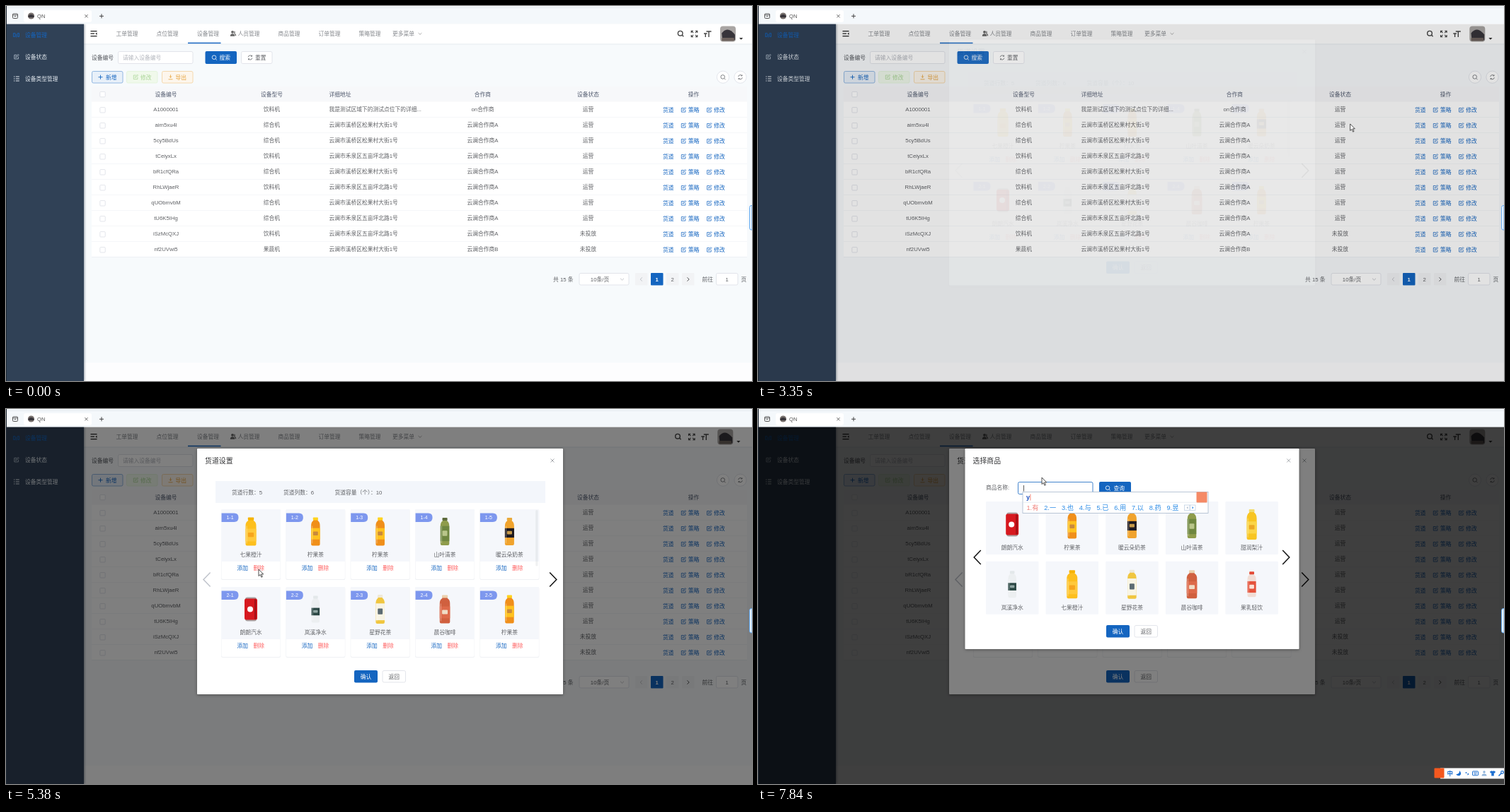
An HTML page for the animation above (8 s loop, 1054x531 px).

```html
<!DOCTYPE html>
<html lang="zh-CN">
<head>
<meta charset="utf-8">
<title>设备管理</title>
<style>
  html, body { margin: 0; width: 100%; height: 100%; overflow: hidden; background: #fff; }
  svg { display: block; width: 1054px; height: 531px; font-family: "Liberation Sans", "Noto Sans CJK SC", "Noto Sans CJK", sans-serif; }
  .side { filter: drop-shadow(1px 0 1.5px rgba(0, 21, 41, .4)); }
  .panel { filter: drop-shadow(0 1px 2px rgba(0, 0, 0, .35)); }
</style>
</head>
<body>
<svg id="stage" viewBox="0 0 1054 531"></svg>
<script>
const LOOP = 8000, PAGE_TOP = 25.4;
const BLUE = '#1465c0', TEXT = '#606266', DARK = '#303133', LINE = '#dcdfe6', TILE = '#f5f7fb', RED = '#ff5f5f';
const stage = document.getElementById('stage');
let parent = stage;

// ---------- drawing helpers ----------
function add(tag, attrs = {}) {
  const node = document.createElementNS(stage.namespaceURI, tag);
  for (const key in attrs) node.setAttribute(key, attrs[key]);
  parent.appendChild(node);
  return node;
}
function group(draw, attrs) {
  const g = add('g', attrs), outer = parent;
  parent = g;
  draw();
  parent = outer;
  return g;
}
const rect = (x, y, width, height, fill, more) => add('rect', { x, y, width, height, fill, ...more });
const circle = (cx, cy, r, fill, more) => add('circle', { cx, cy, r, fill, ...more });
const line = (d, stroke, w = 0.8, more) => add('path', { d, stroke, fill: 'none', 'stroke-width': w, ...more });
const shape = (d, fill, more) => add('path', { d, fill, ...more });
function text(x, cy, str, fill = TEXT, { size = 7.75, anchor = 'start', weight = 400 } = {}) {
  const node = add('text', { x, y: cy + size * 0.37, fill, 'font-size': size, 'text-anchor': anchor, 'font-weight': weight });
  node.textContent = str;
  return node;
}
const center = (x, cy, str, fill, more) => text(x, cy, str, fill, { anchor: 'middle', ...more });
const box = (x, y, w, h, fill = '#fff', stroke = LINE) =>
  rect(x + .5, y + .5, w - 1, h - 1, fill, { rx: 2, stroke, 'stroke-width': .8 });

// ---------- icons ----------
function magnifier(x, y, color, r = 2.8, w = .8) {
  circle(x - .3, y - .3, r, 'none', { stroke: color, 'stroke-width': w });
  line(`M${x + r * .7} ${y + r * .7}l${r * .6} ${r * .6}`, color, w);
}
function refresh(x, y, color) {
  line(`M${x - 2.8} ${y - .6}a2.9 2.9 0 0 1 5.3-1.2v-1.6m0 1.6h-1.6M${x + 2.8} ${y + .6}a2.9 2.9 0 0 1-5.3 1.2v1.6m0-1.6h1.6`, color);
}
function edit(x, y, color) {
  line(`M${x + .5} ${y - 2.7}h-3.2v5.6h5.6v-3M${x - .8} ${y + .8}l.3-1.3 3.1-3.1 1 1-3.1 3.1z`, color, .75);
}
const cross = (x, y, color, r = 2.5) => line(`M${x - r} ${y - r}l${2 * r} ${2 * r}m0 ${-2 * r}l${-2 * r} ${2 * r}`, color);
const plus = (x, y, color, r = 3) => line(`M${x - r} ${y}h${2 * r}M${x} ${y - r}v${2 * r}`, color, .9);
const sideChevron = (x, y, dx, dy, color, w = .8) =>
  line(`M${x - dx} ${y - dy}L${x + dx} ${y}L${x - dx} ${y + dy}`, color, w);
const downChevron = (x, y, color) => line(`M${x - 2.4} ${y - 1.2}l2.4 2.3 2.4-2.3`, color);
function avatar(x, y, w, h, r) {
  rect(x, y, w, h, '#a9a5a3', { rx: r });
  shape(`M${x + w * .1} ${y + h * .45}q${w * .4} ${-h * .5} ${w * .85} ${h * .1}v${h * .35}h${-w * .8}z`, '#37343a');
  rect(x + w * .1, y + h * .75, w * .8, h * .2, '#6d625d', { rx: 1 });
}

// ---------- browser bar, sidebar, page ----------
function browserBar() {
  rect(0, 0, 1054, PAGE_TOP, '#f4f8fb');
  rect(0, 2, 1054, .8, '#e3e9ee');
  rect(25, 6, 96, 17, '#fff', { rx: 3 });
  rect(9.5, 11, 7, 6.5, 'none', { stroke: '#444', 'stroke-width': .9, rx: 1 });
  line('M9.5 12.8h7M11.5 15.3l1.5-1.2 1.5 1.2', '#444', .8);
  circle(35.5, 14, 4.6, '#77706d');
  shape('M31.5 14q4-4 8 0v2h-8z', '#37343a');
  text(44, 14.5, 'QN', '#555', { size: 7.6 });
  cross(113.5, 14.3, '#444', 2.1);
  plus(135, 14.3, '#333');
}
function sidebar() {
  rect(0, PAGE_TOP, 110, 531 - PAGE_TOP, '#304156', { class: 'side' });
  line('M10.5 38.5v5h2.4v-5zM14.5 39.5v5M16.5 38.5h2v5h-2z', BLUE, .8);
  text(27, 41, '设备管理', BLUE);
  edit(14.5, 72, '#c5d0dc');
  text(27, 72, '设备状态', '#e4eaf0');
  line('M11 100h1.3m1.5 0h5M11 103h1.3m1.5 0h5M11 106h1.3m1.5 0h5', '#e4eaf0', 1.1);
  text(27, 103, '设备类型管理', '#e4eaf0');
}
let headerTools;
function header() {
  rect(110, PAGE_TOP, 944, 54 - PAGE_TOP, '#fff');
  rect(110, 53.5, 944, 1, '#e6ebf0');
  line('M119.5 35.7h9M119.5 39.2h5.5M119.5 42.7h9', '#222', 1.2);
  shape('M128.5 37.5v3.4l-2.2-1.7z', '#222');
  '工单管理 点位管理 设备管理 人员管理 商品管理 订单管理 策略管理 更多菜单'.split(' ').forEach((name, i) =>
    center([171, 228, 285.5, 343, 400, 457, 514, 561.5][i], 39.3, name, '#85888d'));
  circle(320, 36.8, 1.9, '#666');
  shape('M316.8 42.8q0-3.6 3.2-3.6t3.2 3.6zM322.6 35.2q2 1.4.6 3.6 2 .6 2 3.4h-1.4q0-2.4-1.6-3.2z', '#666');
  downChevron(585, 39.3, '#999');
  rect(257, 51.7, 46.5, 1.5, BLUE);
  headerTools = group(() => {
    magnifier(953, 39, '#444', 3.3, 1.4);
    for (const [x, y] of [[-1, -1], [1, -1], [-1, 1], [1, 1]])
      line(`M${972.5 + x * 1.3} ${39.5 + y * 1.3}l${x * 3} ${y * 3}m${-x * 2.8} 0h${x * 2.8}v${-y * 2.8}`, '#444', 1.1);
    line('M989.5 36h7M993 36v8M986 39h4.6M988.3 39v5', '#444', 1.4);
    avatar(1009, 28.5, 22, 22, 4);
    shape('M1036 45h5.2l-2.6 2.7z', '#333');
  });
}
function toolbar() {
  text(121, 73, '设备编号', '#505359', { weight: 500 });
  box(158, 64, 106.5, 18);
  text(165, 73, '请输入设备编号', '#b3b6bd');
  rect(281.5, 64, 44.5, 18, BLUE, { rx: 2 });
  magnifier(294.3, 73, '#fff');
  text(301.5, 73, '搜索', '#fff', { weight: 500 });
  box(332, 64, 44.5, 18);
  refresh(345, 73, TEXT);
  text(352, 73, '重置');
  box(121, 92, 44.5, 17.5, '#e8f0f9', '#7ca9db');
  plus(133.5, 100.7, BLUE);
  text(141, 100.7, '新增', BLUE);
  box(170, 92, 44.5, 17.5, '#f0f9eb', '#e1f3d8');
  edit(183, 100.7, '#a9d596');
  text(190, 100.7, '修改', '#a9d596');
  box(220, 92, 44.5, 17.5, '#fdf6ec', '#f3d19e');
  line('M232.5 97.3v4m-1.8-1.7l1.8 1.7 1.8-1.7M229.5 103.8h6', '#e6a23c');
  text(239.5, 100.7, '导出', '#e6a23c');
  for (const x of [1013, 1037.5]) circle(x, 100.7, 8.6, '#fff', { stroke: LINE, 'stroke-width': .8 });
  magnifier(1013, 100.7, TEXT);
  refresh(1037.5, 100.7, TEXT);
}
const streetA = '云澜市溪桥区松果村大街1号', streetB = '云澜市禾泉区五亩坪北路1号';
const codes = 'A1000001 aim5xu4l 5cy5BdUs tCeiyxLx bR1cfQRa RhLWjaeR qUObmvbM tU6K5IHg iSzMcQXJ nf2UVwi5'.split(' ');
const kinds = '饮综综饮综饮综综饮果';
const rowBacks = [];
const checkbox = y => rect(132.8, y - 3.6, 7.4, 7.4, '#fff', { rx: 1, stroke: LINE, 'stroke-width': .8 });
function table() {
  rect(121, 114.5, 926, 21, '#f7f8fa');
  checkbox(125);
  const head = { weight: 500 };
  [['设备编号', 226], ['设备型号', 375.5], ['合作商', 673.5], ['设备状态', 822.5], ['操作', 971.5]].forEach(([name, x]) =>
    center(x, 124.7, name, '#515a6e', head));
  text(456.5, 124.7, '详细地址', '#515a6e', head);
  codes.forEach((code, i) => {
    const y = 146.6 + 22 * i;
    rowBacks.push(rect(121, y - 11, 926, 22, '#fff'));
    rect(121, y + 10.5, 926, .7, '#e9edf3');
    checkbox(y + .6);
    center(226, y, code);
    center(375.5, y, kinds[i] === '果' ? '果蔬机' : kinds[i] === '饮' ? '饮料机' : '综合机');
    text(456.5, y, i ? ('3578'.includes(i) ? streetB : streetA) : '我是测试区域下的测试点位下的详细...');
    center(673.5, y, i ? '云澜合作商' + (i === 9 ? 'B' : 'A') : 'on合作商');
    center(822.5, y, i < 8 ? '运营' : '未投放');
    text(928, y + .6, '货道', BLUE);
    edit(957, y + .6, BLUE);
    text(964, y + .6, '策略', BLUE);
    edit(993.3, y + .6, BLUE);
    text(1000.3, y + .6, '修改', BLUE);
  });
}
function pager() {
  const y = 387;
  text(773, y, '共 15 条');
  box(809.5, 378, 71, 17.5);
  center(839, y, '10条/页');
  downChevron(870.5, y, '#b0b3b9');
  for (const x of [889, 911, 933, 955]) rect(x, 378, 17.5, 17.5, x === 911 ? BLUE : '#f2f3f5', { rx: 1 });
  sideChevron(897.5, y, -1.4, 2.6, '#b5b8be');
  center(919.7, y, '1', '#fff', { weight: 700 });
  center(941.7, y, '2');
  sideChevron(963.8, y, 1.4, 2.6, DARK);
  text(983.5, y, '前往');
  box(1003, 378, 31.5, 17.5);
  center(1018.7, y, '1');
  text(1038.5, y, '页');
}

// ---------- drinks: name, width, height, body, cap, label, accent, label top and height ----------
const drinks = {
  juice: ['七果橙汁', 15, 40, '#fdbf1d', '#f6b300', '#ffc93a', '#f7a51c', .4, .45],
  tea: ['柠果茶', 12.5, 40, '#f08f1a', '#ffd31f', '#ffc21f', '#c98a3c', .38, .4],
  green: ['山叶清茶', 12.5, 39, '#8f9c4c', '#5d6b3c', '#6f8740', '#b9c58a', .3, .55],
  milk: ['暖云朵奶茶', 13, 39, '#f0a32d', '#e9a93a', '#1d1a22', '#c79a4a', .38, .34],
  can: ['朗朗汽水', 18, 34, '#d7191f'],
  water: ['岚溪净水', 11.5, 38, '#eceff1', '#e3e8ea', '#2b4744', '#8fa5a2', .45, .28],
  flower: ['星野花茶', 12.5, 41, '#f0c640', '#efe9d6', '#f8f4e4', '#5c6b72', .3, .58],
  coffee: ['晨谷咖啡', 14.5, 40, '#d0603f', '#ecd0ad', '#dd6a4a', '#f0dcc6', .4, .42],
  pear: ['甜润梨汁', 14, 43, '#f8c522', '#f2dc6b', '#fbd548', '#eca826', .4, .4],
  yogurt: ['果乳轻饮', 12, 36, '#f1ddd5', '#e34a35', '#e5533c', '#fbe3d6', .38, .45],
};
function drink(kind, cx, cy) {
  const [, w, h, body, cap, label, accent, labelTop, labelHeight] = drinks[kind];
  const top = cy - h / 2, half = w / 2, neck = w * .25, shoulder = top + h * .3;
  if (kind === 'can') {
    rect(cx - half + 1, top, w - 2, h, '#a9a4a4', { rx: 3 });
    rect(cx - half, top + 2, w, h - 4, body, { rx: 2.5 });
    rect(cx + half - 4, top + 3, 2.5, h - 6, '#a40f16');
    circle(cx - 1, cy, 4, '#fff');
    return;
  }
  shape(`M${cx - neck} ${top + 3}h${2 * neck}v${h * .04}Q${cx + half} ${top + h * .16} ${cx + half} ${shoulder}V${top + h - 2}q0 2-2 2H${cx - half + 2}q-2 0-2-2V${shoulder}Q${cx - half} ${top + h * .16} ${cx - neck} ${top + 3 + h * .04}z`, body);
  rect(cx - neck - .4, top, neck * 2 + .8, 4, cap, { rx: .8 });
  rect(cx - half, top + h * labelTop, w, h * labelHeight, label);
  rect(cx - half * .55, top + h * (labelTop + labelHeight * .3), w * .55, h * labelHeight * .35, accent, { rx: 1 });
  rect(cx - half + 1, shoulder, 1.2, h * .62, '#fff', { opacity: .3 });
}
const drinkName = (kind, x, y) => center(x, y, drinks[kind][0]);

// ---------- dialogs ----------
function frame(x, y, w, h, title, closeX) {
  rect(x, y, w, h, '#fff', { rx: 1, class: 'panel' });
  text(x + 11, 73.5, title, DARK, { size: 9.9 });
  cross(closeX, 73, '#909399');
}
function confirmRow(y) {
  rect(492, y, 33, 17.5, BLUE, { rx: 2 });
  center(508.6, y + 8.8, '确认', '#fff', { weight: 500 });
  box(531.5, y, 33.5, 17.5);
  center(548.3, y + 8.8, '返回');
}
const bigArrow = (x, y, dir, color) => sideChevron(x, y, 4.8 * dir, 10, color, 1.5);

let stocked, emptied, scrollThumb;
function emptyPicture() {
  rect(323, 151, 46, 42.5, '#d0d5e4', { rx: 7 });
  circle(335.5, 163.5, 4.2, TILE);
  shape('M327 183q8-10 15-4 3 2 6-3 8-13 17-2v12q0 4-4 4h-30q-4 0-4-4z', TILE);
}
function laneDialog() {
  frame(270, 56, 517, 348, '货道设置', 772);
  rect(296, 102, 466, 31, '#f3f6fb');
  text(319, 118, '货道行数：5');
  text(392, 118, '货道列数：6');
  text(464.5, 118, '货道容量（个）：10');
  'juice tea tea green milk can water flower coffee tea'.split(' ').forEach((kind, i) => {
    const col = i % 5, row = Math.floor(i / 5), x = 304.5 + 91.35 * col, y = 142 + 110 * row, mid = x + 41.5;
    rect(x - .5, y, 84, 100, '#eff1f4', { rx: 2 });
    rect(x, y, 83, 99, '#fff', { rx: 2 });
    rect(x, y, 83, 74, TILE);
    const content = group(() => {
      drink(kind, mid, y + 31.5);
      drinkName(kind, mid, y + 64.3);
      text(mid + 3.5, y + 83.3, '删除', RED);
    });
    if (!i) {
      stocked = content;
      emptied = group(() => {
        emptyPicture();
        center(mid, y + 64.3, '暂无商品');
        text(mid + 3.5, y + 83.3, '删除', '#b4b8c0');
      });
    }
    text(mid - 19.5, y + 83.3, '添加', BLUE);
    shape(`M${x} ${y + 5.5}h18q6 0 6 6.2t-6 6.2h-18z`, '#7d97ee');
    center(x + 12, y + 11.7, `${row + 1}-${col + 1}`, '#fff', { size: 7 });
  });
  scrollThumb = rect(748.3, 143, 3.2, 79.5, '#c4c6ca', { rx: 1.6 });
  bigArrow(283.8, 241.5, -1, '#c0c4cc');
  bigArrow(773, 241.5, 1, '#111');
  confirmRow(370);
}
let nameInput, hint, caret;
function productDialog() {
  frame(292.5, 56, 472, 284, '选择商品', 749.7);
  text(322, 111.5, '商品名称:', TEXT, { weight: 500 });
  nameInput = box(367, 103, 106.5, 18);
  hint = text(373.5, 112, '请输入', '#b3b6bd');
  caret = rect(375, 108, .8, 8.5, '#333');
  rect(482, 103, 45, 18, BLUE, { rx: 2 });
  magnifier(494.3, 112, '#fff');
  text(502.5, 112, '查询', '#fff', { weight: 500 });
  'can tea milk green pear water juice flower coffee yogurt'.split(' ').forEach((kind, i) => {
    const x = 322 + 84.6 * (i % 5), y = 131 + 84.7 * Math.floor(i / 5), mid = x + 37.2;
    rect(x, y, 74.5, 75, TILE, { rx: 1 });
    drink(kind, mid, y + 32.5);
    drinkName(kind, mid, y + 65);
  });
  bigArrow(310, 210, -1, '#111');
  bigArrow(746, 210, 1, '#111');
  confirmRow(306);
}
function modal(draw) {
  let panel;
  const layer = group(() => {
    rect(1, PAGE_TOP, 1053, 531 - PAGE_TOP, '#000', { opacity: .5 });
    panel = group(draw);
  });
  return { layer, panel };
}

// ---------- input method ----------
let modeLabel;
function inputBar() {
  const c = '#1d6fd0';
  rect(964, 508.5, 90, 15, '#fff');
  rect(955.5, 508.5, 14, 14, '#f4581f', { rx: 1 });
  modeLabel = text(973.5, 516, '英', c, { size: 8.5, weight: 700 });
  shape('M991 512q.6 5-4.8 5.2 2 3 5.4 1.7 3.5-2.5-.6-6.9z', c);
  circle(1000.5, 515, .9, c);
  shape('M1002.5 516h1.8q0 2-1.7 2.7z', c);
  rect(1009.5, 513, 8, 5.8, 'none', { stroke: c, rx: .8 });
  line('M1011 515h5M1011.5 517h4', c, .9);
  circle(1026, 514, 1.7, '#8fb3da');
  shape('M1022.5 519.5q0-3 3.5-3t3.5 3z', '#8fb3da');
  shape('M1034 513.5l2.5-1.3q1.5 1 3 0l2.5 1.3-1 2.2-1.2-.5v4.4h-3.6v-4.4l-1.2.5z', c);
  line('M1046.5 519.5l4-4', c, 1.6);
  circle(1051.5, 514.5, 1.8, 'none', { stroke: c, 'stroke-width': 1.2 });
}
function candidates() {
  rect(374, 117.5, 262, 30, '#fff', { stroke: '#a8b8cc', 'stroke-width': .8 });
  text(379, 125, 'y', '#1b4fc0', { size: 9, weight: 700 });
  rect(384.5, 120.5, .8, 9, '#f06a5a');
  rect(375, 131.8, 260, .7, '#dfe5ec');
  [...'有一也与已用以药昱'].forEach((word, i) =>
    text(379.5 + 24.75 * i, 139.8, `${i + 1}.${word}`, i ? '#2a8be6' : '#f0807a', { size: 9.2 }));
  for (const x of [602.5, 610.5]) rect(x, 136, 7.5, 7.5, '#fff', { stroke: '#b9cbe0', 'stroke-width': .7 });
  shape('M607.5 138v3.5l-2-1.7z', '#aab8c8');
  shape('M613.5 138v3.5l2-1.7z', '#2a8be6');
  rect(619.5, 117.5, 15, 15, '#f58a66', { rx: 1 });
}

// ---------- pointer ----------
const pointers = {};
function pointerShapes() {
  const edge = { stroke: '#222', 'stroke-width': .8, 'stroke-linejoin': 'round' };
  pointers.arrow = shape('M0 0V9.5l2.2-2 1.7 3.7 1.5-.7-1.7-3.6h3z', '#fff', edge);
  pointers.hand = shape('M-1.2 1.2a1.2 1.2 0 0 1 2.4 0v4l4 1q1.3.5 1.1 2l-.4 2.6-1 2.7h-4.7l-3.3-4.7q-.6-1.6.8-1.5l1.1 1z', '#fff', edge);
  pointers.beam = line('M-2-6.5q2 0 2 1.5v10q0 1.5-2 1.5M2-6.5q-2 0-2 1.5v10q0 1.5 2 1.5', '#222', .8);
}

// ---------- scene ----------
rect(0, 0, 1054, 531, '#fdfdfe');
rect(110, 54, 944, 451, '#f7fafc');
header();
toolbar();
table();
pager();
sidebar();
const lanes = modal(laneDialog), products = modal(productDialog);
browserBar();
rect(0, 0, 1, 531, '#1c2733');
shape('M1054 282.5h-1q-2.5 0-2.5 3v28.5q0 3 2.5 3h1z', '#e6f3ff', { stroke: '#5aa4f0', 'stroke-width': .9 });
const imeBar = group(inputBar), imeList = group(candidates), pointer = group(pointerShapes);

// ---------- motion: time, x, y, pointer shape from then on ----------
const path = [
  [70, 1000, 480, 'arrow'], [300, 975, 330], [560, 945, 215], [830, 935, 172], [900, 935, 172], [1180, 938, 150],
  [1400, 930, 185], [1660, 934, 162], [1730, 934, 162], [2000, 940, 206], [2250, 922, 180], [2510, 926, 159],
  [2580, 926, 159], [2720, 931, 150, 'hand'], [2860, 935, 146], [3130, 935, 146, 'arrow'], [3350, 839, 167],
  [3620, 200, 159], [3760, 200, 159], [3900, 290, 205], [4060, 339, 233, 'hand'], [4160, 339, 233], [4300, 351, 232],
  [4510, 351, 231], [4920, 357, 227], [5380, 357, 227, 'arrow'], [5590, 350, 228], [5790, 350, 228, 'hand'],
  [6210, 337, 228], [6400, 337, 228, 'arrow'], [6610, 337, 228, 'hand'], [6750, 337, 228, 'arrow'],
  [7160, 418, 136], [7220, 418, 136, 'beam'], [7500, 416, 111], [7639, 416, 111], [7640, 401, 97, 'arrow'], [LOOP, 401, 97],
];
function pointerAt(t) {
  let kind = 'arrow', i = 0;
  for (; i < path.length - 1 && path[i + 1][0] <= t; i++) kind = path[i][3] || kind;
  const [t0, x0, y0, own] = path[i], [t1, x1, y1] = path[Math.min(i + 1, path.length - 1)];
  const k = t1 > t0 ? Math.max(0, (t - t0) / (t1 - t0)) : 0;
  return { x: x0 + (x1 - x0) * k, y: y0 + (y1 - y0) * k, kind: own || kind };
}
const clamp = v => Math.min(1, Math.max(0, v));
// cubic-bezier(.25, .1, .25, 1)
function ease(x) {
  if (x <= 0 || x >= 1) return clamp(x);
  let lo = 0, hi = 1, s;
  const bez = (a, b) => 3 * a * s * (1 - s) ** 2 + 3 * b * s * s * (1 - s) + s ** 3;
  for (let i = 0; i < 20; i++) {
    s = (lo + hi) / 2;
    if (bez(.25, .25) < x) lo = s; else hi = s;
  }
  return bez(.1, 1);
}
const show = (node, on) => node.setAttribute('display', on ? 'inline' : 'none');
function fade({ layer, panel }, t, start) {
  const p = ease((t - start) / 300);
  show(layer, p > 0);
  layer.setAttribute('opacity', p);
  panel.setAttribute('opacity', p);
  panel.setAttribute('transform', `translate(0 ${-11 * (1 - p)})`);
}
function render(t) {
  const at = pointerAt(t), hovered = t >= 70 && t < 3130 ? Math.floor((at.y - 135.6) / 22) : -1;
  rowBacks.forEach((back, i) => back.setAttribute('fill', i === hovered ? '#f5f7fa' : '#fff'));
  show(pointer, t >= 70);
  pointer.setAttribute('transform', `translate(${at.x} ${at.y})`);
  for (const kind in pointers) show(pointers[kind], kind === at.kind);

  fade(lanes, t, 3300);
  fade(products, t, 6568);
  headerTools.setAttribute('transform', `translate(${t >= 3300 ? -3.7 : 0} 0)`);
  scrollThumb.setAttribute('opacity', .25 + .75 * clamp((t - 6400) / 140));
  show(stocked, t < 5400);
  show(emptied, t >= 5400);

  const focused = t >= 7640, typing = t >= 7840;
  nameInput.setAttribute('stroke', focused ? BLUE : LINE);
  show(caret, focused);
  show(hint, !typing);
  show(imeList, typing);
  show(imeBar, (t >= 70 && t < 3130) || focused);
  modeLabel.textContent = focused ? '中' : '英';
}
const begin = performance.now();
function tick() {
  render((performance.now() - begin) % LOOP);
  requestAnimationFrame(tick);
}
tick();
</script>
</body>
</html>
```
